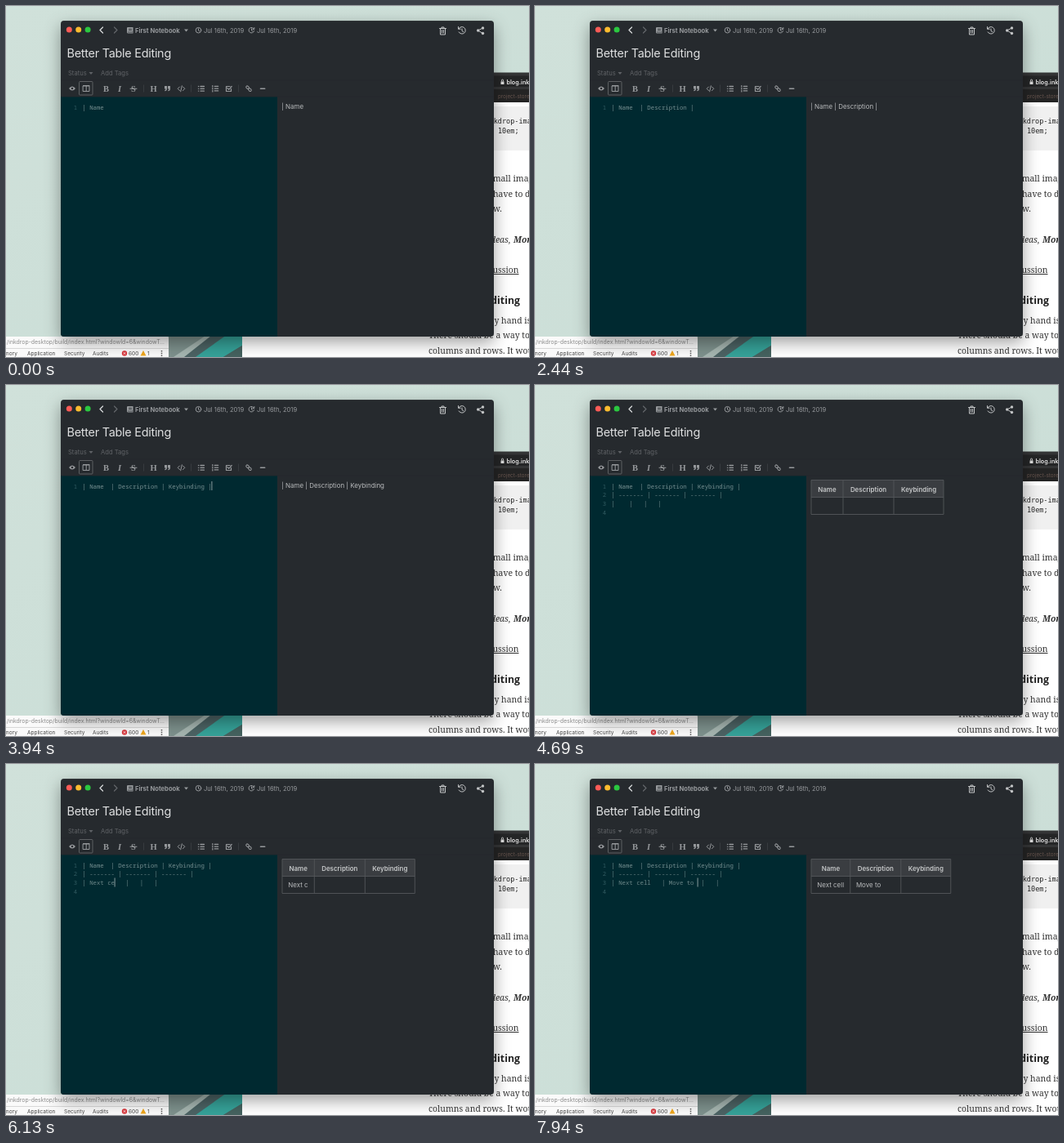
Recreate the animation shown at these times as an HTML page. Size 640 by 430 pixels, loop 8 s.

```html
<!DOCTYPE html>
<html lang="en">
<head>
<meta charset="utf-8">
<title>Table editing</title>
<style>
  html, body { margin: 0; width: 100%; height: 100%; overflow: hidden; background: #cfe0d9; }
  svg { display: block; width: 640px; height: 430px; font-family: Inter, sans-serif; }
  text { white-space: pre; }
  .line { fill: none; stroke: currentColor; stroke-width: 1; stroke-linecap: round; stroke-linejoin: round; }
  .serif { font: 10.4px "Noto Serif", serif; fill: #333; }
  .code { font: 8.5px "DejaVu Sans Mono", monospace; fill: #222; }
  .editor { font: 7.33px "Noto Sans Mono", monospace; fill: #789092; }
  .gutter { font: 7.33px "Noto Sans Mono", monospace; fill: #325c62; }
  .preview { font-size: 7.95px; fill: #b9bbbd; }
  .head { font-weight: 600; text-anchor: middle; fill: #c5c7c8; }
  .tools { color: #96999c; fill: #96999c; }
  .dev { font-size: 6.5px; fill: #454545; }
</style>
</head>
<body>
<svg viewBox="0 0 640 430">
  <defs>
    <linearGradient id="wall" x2="1" y2="1">
      <stop stop-color="#d0e1da"/><stop offset="1" stop-color="#c9ddd6"/>
    </linearGradient>
    <filter id="shadow" x="-20%" y="-20%" width="140%" height="140%">
      <feDropShadow dx="0" dy="7" stdDeviation="10" flood-opacity=".38"/>
    </filter>
  </defs>
  <rect width="640" height="430" fill="url(#wall)"/>

  <!-- wallpaper corner -->
  <path d="M199 398H289V430H199Z" fill="#a5b5b0"/>
  <path d="M199 400H250L205 430H199Z" fill="#7d908c"/>
  <path d="M218 430L256 400H289V430Z" fill="#4b6263"/>
  <path d="M232 430L270 403H289V416L266 430Z" fill="#35a198"/>
  <path d="M266 430L289 416V430Z" fill="#45625f"/>

  <!-- developer tools -->
  <path d="M0 405H197Q199 405 199 407V430H0Z" fill="#fafafa"/>
  <path d="M0 419.500H199" stroke="#d8d8d8"/>
  <g class="dev">
    <text x="194" y="414" text-anchor="end" font-size="6.900" fill="#8c8c8c">/inkdrop-desktop/build/index.html?windowId=6&amp;windowT…</text>
    <text x="-2" y="428">mory</text><text x="26" y="428">Application</text>
    <text x="71" y="428">Security</text><text x="106" y="428">Audits</text>
    <text x="150" y="428">600</text><text x="173" y="428">1</text>
  </g>
  <circle cx="145" cy="425.500" r="3.200" fill="#d8343a"/>
  <path d="M143.700 424.200l2.600 2.600m0-2.600l-2.600 2.600" stroke="#fff" stroke-width=".8"/>
  <path d="M168 422l3.500 6.500h-7z" fill="#eda51c"/>
  <path d="M190.500 422v7" stroke="#555" stroke-width="1.500" stroke-dasharray="1.500 1.300"/>

  <!-- browser -->
  <path d="M289 82H640V430H289Z" fill="#fff"/>
  <path d="M289 81.500H640V102H289Z" fill="#343536"/>
  <path d="M480 85.500H640V99H480Z" fill="#242526"/>
  <path d="M289 102H640V118H289Z" fill="#242424"/>
  <path d="M605.500 92.500h4v3.500h-4z" fill="#ddd"/>
  <path d="M606.500 92.500v-1.500a1 1 0 0 1 2 0v1.500" fill="none" stroke="#ddd" stroke-width=".8"/>
  <text x="612.500" y="95.700" font-size="7.200" font-weight="600" fill="#e2e2e2">blog.inkdrop.info</text>
  <text x="602" y="112.700" font-size="6.300" fill="#66544d">project-store</text>
  <path d="M500 123H640V177H500Z" fill="#f0f0f0"/>
  <g class="code">
    <text x="586.500" y="144">inkdrop-image</text><text x="602" y="156">10em;</text>
  </g>
  <g class="serif">
    <text x="591" y="215">small images</text>
    <text x="596" y="234">have to do</text>
    <text x="596" y="252">w.</text>
    <text x="617.500" y="289.500" text-anchor="end" font-style="italic">ideas,</text>
    <text x="621" y="289.500" font-style="italic" font-weight="700">Morwen</text>
    <text x="627.500" y="327" text-anchor="end" text-decoration="underline">Discussion</text>
    <text x="597.500" y="388.500">y hand is</text>
    <text x="517" y="407">There should be a way to</text>
    <text x="517" y="425.500">columns and rows. It would</text>
  </g>
  <text x="629" y="364.500" text-anchor="end" font-family="Open Sans, sans-serif" font-size="12.300" font-weight="700" fill="#222">Editing</text>

  <!-- note window -->
  <rect x="67" y="18" width="530" height="387" rx="4" fill="#282b2f" filter="url(#shadow)"/>
  <path d="M67 111H332V405H71Q67 405 67 401Z" fill="#002930"/>
  <path d="M70 18.500H594" stroke="#36393c" stroke-width=".7"/>
  <path d="M67 91H597M67 111H597" stroke="#25282c" stroke-width=".8"/>
  <circle cx="77.300" cy="29" r="3.500" fill="#fc5b57"/>
  <circle cx="88.700" cy="29" r="3.500" fill="#fdbc2f"/>
  <circle cx="100.100" cy="29" r="3.500" fill="#2bc840"/>
  <path class="line" d="M118.500 26l-3.500 3.500 3.500 3.500" color="#d5d7d8" style="stroke-width:1.300"/>
  <path class="line" d="M132.500 26l3.500 3.500-3.500 3.500" color="#63666a" style="stroke-width:1.200"/>
  <g class="tools">
    <path d="M149 26h6.500v7.500h-6.500q-1-.2-1-1.200v-5.100q0-1.200 1-1.200z"/>
    <path d="M150 28h4m-4 1.500h4m-5 2.500h6" stroke="#282b2f" stroke-width=".7"/>
    <path d="M218 28.500h5l-2.500 3z"/>
    <g class="line" stroke-width=".8">
      <circle cx="235.500" cy="29.700" r="3.300"/><path d="M235.500 27.800v2.200l1.300.8"/>
      <path d="M303.500 28.500a3.300 3.300 0 1 0 .1 2M303.800 26.500v2h-2M300.500 27.800v2.200l1.300.8"/>
    </g>
    <text x="158" y="32.500" font-size="7.600" font-weight="700">First Notebook</text>
    <text x="242" y="32.500" font-size="7.600">Jul 16th, 2019</text>
    <text x="307" y="32.500" font-size="7.600">Jul 16th, 2019</text>
  </g>
  <g color="#c3c5c6">
    <path class="line" d="M530.500 27.500h8m-5.500 0v-1.500h3v1.500m-4.500 0v7.500h6v-7.500m-4 2v3.500m2-3.500v3.500"/>
    <path class="line" d="M554 28a4.300 4.300 0 1 1 .2 4M553.500 25.500v2.700h2.700M558 28v2.500l1.700 1"/>
    <path class="line" d="M583.500 27l-6 3 6 3.500"/>
    <g fill="currentColor"><circle cx="583.500" cy="27" r="1.700"/><circle cx="577.700" cy="30" r="1.700"/><circle cx="583.500" cy="33.500" r="1.700"/></g>
  </g>
  <text x="74.500" y="63" font-size="14.400" letter-spacing="-.25" fill="#dfe0e1">Better Table Editing</text>
  <g font-size="7.600" fill="#606367">
    <text x="76" y="85">Status</text><path d="M101.500 81h5l-2.500 3z"/>
    <text x="116" y="85">Add Tags</text>
  </g>

  <!-- formatting bar -->
  <g class="tools">
    <path d="M77 101q4-5 8 0q-4 5-8 0z"/><circle cx="81" cy="101" r="1.300" fill="#282b2f"/>
    <rect class="line" x="89.500" y="92.500" width="16.500" height="16.500" rx="1" color="#5d6063"/>
    <path class="line" d="M94.500 98h7.500v6.500h-7.500zM98.200 98v6.500M94.500 97.500h7.500" color="#96999c"/>
    <g font-family="Liberation Serif, serif" font-size="10.500" text-anchor="middle">
      <text x="122.500" y="104.800" font-weight="700">B</text>
      <text x="139" y="104.800" font-style="italic" font-weight="700">I</text>
      <text x="156" y="104.800" font-weight="700">S</text>
      <text x="180.500" y="104.800" font-weight="700">H</text>
    </g>
    <path class="line" d="M152 101.300h8" stroke-width=".8"/>
    <path d="M194 98h3v3.500q0 2.500-2.700 2.800v-1.200q1.200-.3 1.200-1.600H194zM198 98h3v3.500q0 2.500-2.700 2.800v-1.200q1.200-.3 1.200-1.600H198z"/>
    <path class="line" d="M212.500 99l-2.300 2.300 2.300 2.300M216.500 99l2.300 2.300-2.300 2.300M215.300 97.800l-1.600 7" stroke-width=".8"/>
    <path class="line" d="M235.500 98.500h.2m2.300 0h4.500m-7 2.800h.2m2.300 0h4.500m-7 2.800h.2m2.300 0h4.500" style="stroke-width:1.300"/>
    <path class="line" d="M252.800 97.500v1.500m0 1.500v1.500m0 1.500v1.500m2.400-6.700h4.500m-4.500 2.800h4.500m-4.500 2.800h4.500" style="stroke-width:1.200"/>
    <path class="line" d="M275.500 101.500v3h-6v-6h4.500M271 100.500l1.700 1.800 3.500-3.800" style="stroke-width:1.200"/>
    <g class="line" transform="rotate(45 297 101.200)"><rect x="293" y="99.800" width="4" height="2.800" rx="1.400"/><rect x="297" y="99.800" width="4" height="2.800" rx="1.400"/></g>
    <path class="line" d="M311.500 101.300h5.200" style="stroke-width:1.600"/>
    <path d="M168.500 96.500v9M226.500 96.500v9M284.500 96.500v9" stroke="#3d4044" stroke-width=".8"/>
  </g>

  <g id="lines"></g>
  <path id="caret" stroke="#8a9c9e"/>
  <text id="plain" class="preview" x="337.200" y="125.500"></text>
  <g id="table" class="preview">
    <path id="headFill" fill="#3a3d41"/>
    <path id="grid" fill="none" stroke="#54575b" stroke-width=".9"/>
    <text class="head" y="130.500">Name</text>
    <text class="head" y="130.500">Description</text>
    <text class="head" y="130.500">Keybinding</text>
    <text id="cell1" x="345.300" y="151"></text>
    <text id="cell2" y="151"></text>
  </g>
</svg>
<script>
const LOOP = 8000, RENDER_DELAY = 140, BLINK = 530;
const ENTER = 4160, TAB = 6940;
const LEFT = 93.4, TOP = 126.700, CHAR = 4.4, ROW = 10.75;
const $ = id => document.getElementById(id);

// Each text pairs with the moments of its key presses.
const header = { text: "| Description | Keybinding |", keys: [
  100, 300, 560, 680, 790, 880, 1000, 1100, 1200, 1290, 1400, 1490, 1590, 1700, 1800, 1910,
  2690, 2780, 2880, 2960, 3060, 3150, 3240, 3320, 3380, 3440, 3560, 3820] };
const first = { text: "Next cell", keys: [4940, 5300, 5500, 5680, 5800, 5950, 6090, 6240, 6420] };
const second = { text: "Move to ", keys: [7080, 7210, 7310, 7410, 7510, 7620, 7740, 7860] };
const allKeys = [-540, ...header.keys, ENTER, ...first.keys, TAB, ...second.keys];

const typed = ({ text, keys }, t) => text.slice(0, keys.filter(k => k <= t).length);
const headerAt = t => "| Name  " + typed(header, t);

function addText(className, x, row) {
  const node = document.createElementNS("http://www.w3.org/2000/svg", "text");
  node.setAttribute("class", className);
  node.setAttribute("x", x);
  node.setAttribute("y", TOP + row * ROW);
  return $("lines").appendChild(node);
}
const rows = [0, 1, 2, 3].map(i => ({
  number: addText("gutter", 82.8, i),
  body: addText("editor", LEFT, i)
}));
rows[1].body.style.fill = rows[2].body.style.fill = "#6b8587";

function drawEditor(t) {
  const a = typed(first, t), b = typed(second, t);
  const lines = [headerAt(t)];
  let row = 0, column = lines[0].length;
  if (t >= ENTER) {
    lines[0] = headerAt(LOOP);
    const rest = b ? b.padEnd(b.length + (b.endsWith("to ") ? 1 : 2)) : "  ";
    lines.push("| ------- | ------- | ------- |", `| ${a}   | ${rest}|   |`, "");
    row = 2;
    column = t < TAB ? 2 + a.length : 7 + a.length + b.length;
  }
  rows.forEach(({ number, body }, i) => {
    number.textContent = i < lines.length ? i + 1 : "";
    body.textContent = lines[i] || "";
  });
  const lastKey = Math.max(...allKeys.filter(k => k <= t));
  const visible = (t - lastKey) % (2 * BLINK) < BLINK;
  $("caret").setAttribute("visibility", visible ? "visible" : "hidden");
  $("caret").setAttribute("d", `M${LEFT + column * CHAR + .1} ${118 + row * ROW}v11`);
}

function drawPreview(t) {
  const tableShown = t >= ENTER;
  $("table").style.display = tableShown ? "" : "none";
  $("plain").textContent = tableShown ? "" : headerAt(t).replace(/ +/g, " ").trim();
  if (!tableShown) return;
  $("cell1").textContent = typed(first, t).trim();
  $("cell2").textContent = typed(second, t).trim();
  const width = Math.max(39, $("cell1").getComputedTextLength() + 15);
  const edges = [338, 338 + width, 400 + width, 461 + width];
  const right = edges[3];
  $("cell2").setAttribute("x", edges[1] + 7.2);
  document.querySelectorAll(".head").forEach((node, i) =>
    node.setAttribute("x", (edges[i] + edges[i + 1]) / 2));
  $("headFill").setAttribute("d", `M338 116.500H${right}V137.500H338Z`);
  $("grid").setAttribute("d", [116.5, 137.5, 158.5].map(y => `M338 ${y}H${right}`).join("") +
    edges.map(x => `M${x} 116.500V158.500`).join(""));
}

function frame() {
  const t = performance.now() % LOOP;
  drawEditor(t);
  drawPreview(t - RENDER_DELAY);
  requestAnimationFrame(frame);
}
frame();
</script>
</body>
</html>
```
